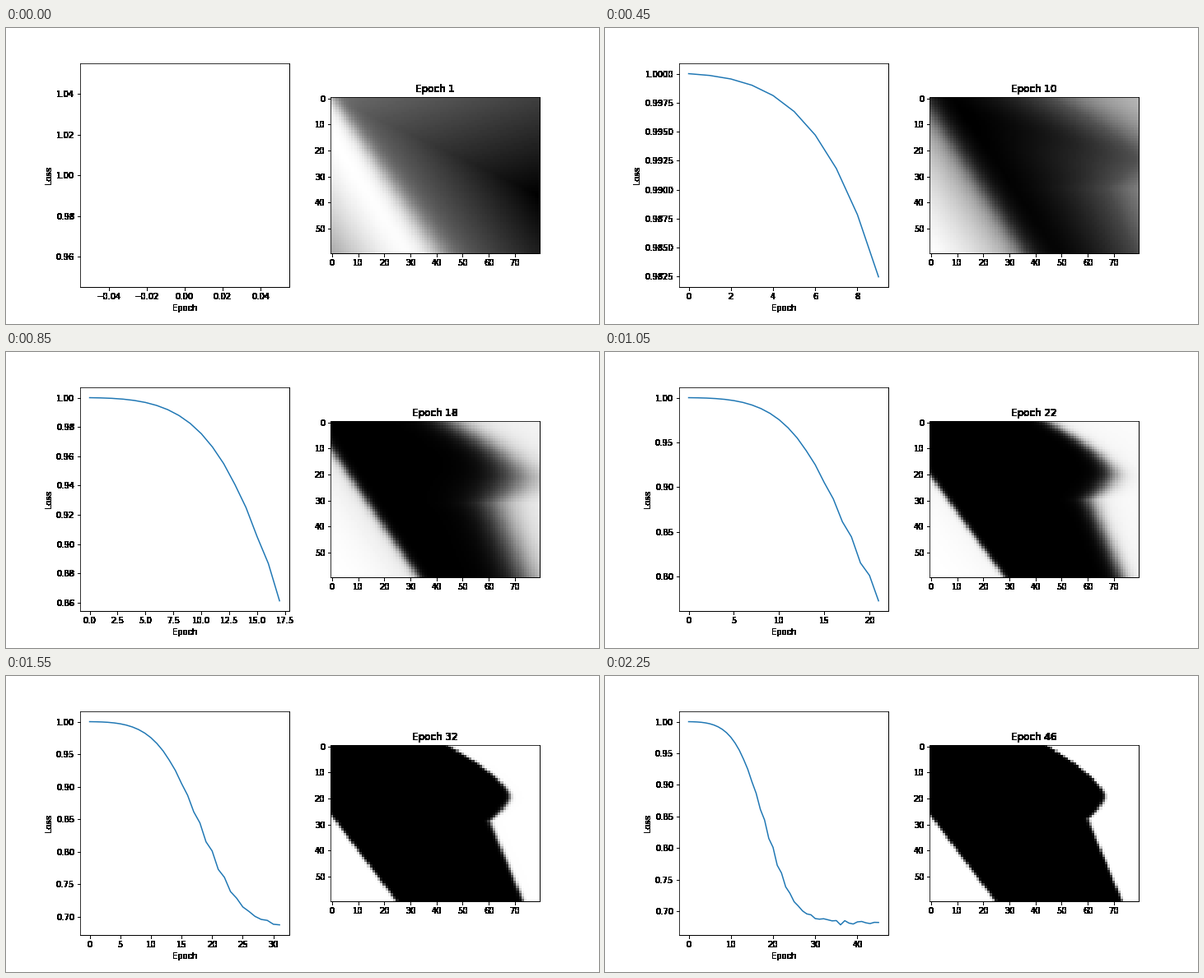
These frames come from a looping animation (720 by 360 pixels, 2300 ms). A matplotlib script:

```python
import numpy as np
import matplotlib.pyplot as plt
from matplotlib.animation import FuncAnimation

plt.rcParams.update({
    "font.family": "DejaVu Sans",
    "font.size": 10,
    "figure.subplot.bottom": 0.125,
})

EPOCHS = 46
H, W = 60, 80
EARLY, SHAPED = 4, 13  # epochs at which the picture changes character
Y, X = np.mgrid[0:H, 0:W].astype(float)
SKEW = X - 0.68 * Y


def sigmoid(v):
    return 0.5 + 0.5 * np.tanh(v / 2)


def loss_curve():
    """Slow start, steep wobbling descent, then a jittery plateau."""
    e = np.arange(EPOCHS)
    warmup = 2.7 * np.exp(-0.245 * e - 0.003 * e ** 2)
    descent = 0.318 * sigmoid(0.3 * (e - 18) + 0.1 - warmup)
    wobble = (0.009 + 0.004 * np.cos(np.pi * e)) * np.exp(-((e - 20) / 4) ** 2)
    jitter = np.random.default_rng(3).normal(0, 0.0018, EPOCHS) * sigmoid(2 * (e - 27))
    return 1.00012 - descent + wobble + jitter


def first_field():
    left = 1 - 0.00195 * np.maximum(-SKEW - 10, 0) ** 1.5
    right = 0.45 - 0.0075 * SKEW + 0.0115 * np.maximum(0.47 * X - Y, 0)
    edge = sigmoid(SKEW / (1.6 + 0.03 * Y))
    return left + (right - left) * edge


def early_field():
    ramp = 3 * np.logaddexp(0, (4 - SKEW) / 3)
    left = 1.34 * (1 - np.exp(-ramp / 35))
    right = 0.0075 * np.maximum(SKEW - 8, 0)
    streak = 0.1 * X / W * np.exp(-((Y - 0.27 * X - 1) / 6) ** 2)
    return 0.04 + left + right - streak


def shaped_field(epoch):
    """Black shape between a straight left edge and a nosed right edge."""
    age = epoch - SHAPED
    blur = np.exp(-age / 4.2)
    fade = np.exp(-age / 1.5)
    slide = np.exp(-(age / 7) ** 2)

    left = (0.76 - 0.11 * slide) * (Y - 27 + 22.5 * slide) - X

    tip_x = 71.6 - 0.11 * epoch + 8 * fade
    tip_y = 19.5 + 4 * blur
    bend = (tip_x - 44.5) / tip_y ** 1.5
    nose = tip_x - bend * np.abs(Y - tip_y) ** 1.5
    chest = 60.5 + 4.5 * fade + 0.42 * (Y - 29)
    right = X - np.where(Y < tip_y, nose, np.maximum(nose, chest))
    soft = (0.25 + 10 * blur) * (1 + 0.4 * np.exp(-((Y - 24) / 7) ** 2))

    def side(dist, width):
        haze = 0.3 * blur * np.exp(-np.maximum(dist, 0) / 12)
        return sigmoid(dist / width) * (1 - haze)

    white = side(left, 0.3 + 1.8 * blur) + (1 - 0.12 * blur) * side(right, soft)
    return np.clip(white, 0, 1)


def field(epoch):
    if epoch >= SHAPED:
        return shaped_field(epoch)
    if epoch <= EARLY:
        start, stop, t = first_field(), early_field(), epoch / EARLY
    else:
        start, stop = early_field(), shaped_field(SHAPED)
        t = (epoch - EARLY) / (SHAPED - EARLY)
    return start + (stop - start) * t


def solid_black(img, dpi):
    """Turn every touched pixel fully black."""
    out = np.zeros_like(img)
    out[..., 3] = img[..., 3] > 0
    return out, 0, 0


loss = loss_curve()
fig, (loss_ax, image_ax) = plt.subplots(1, 2, figsize=(10, 5), dpi=72, facecolor="white")
line, = loss_ax.plot([0], loss[:1], color="#1f77b4", lw=1.5)
loss_ax.set(xlabel="Epoch", ylabel="Loss")
image = image_ax.imshow(field(0), cmap="gray", interpolation="nearest")
title = image_ax.set_title("Epoch 1", fontsize=12)

for ax in (loss_ax, image_ax):
    for part in (ax.xaxis, ax.yaxis, ax.title, ax.spines["right"], ax.spines["bottom"]):
        part.set_agg_filter(solid_black)


def draw(epoch):
    line.set_data(np.arange(epoch + 1), loss[:epoch + 1])
    loss_ax.relim()
    loss_ax.autoscale_view()
    image.set_data(field(epoch))
    image.autoscale()
    title.set_text(f"Epoch {epoch + 1}")
    return line, image, title


anim = FuncAnimation(fig, draw, frames=EPOCHS, interval=50, repeat=True, repeat_delay=0)
plt.show()
```
